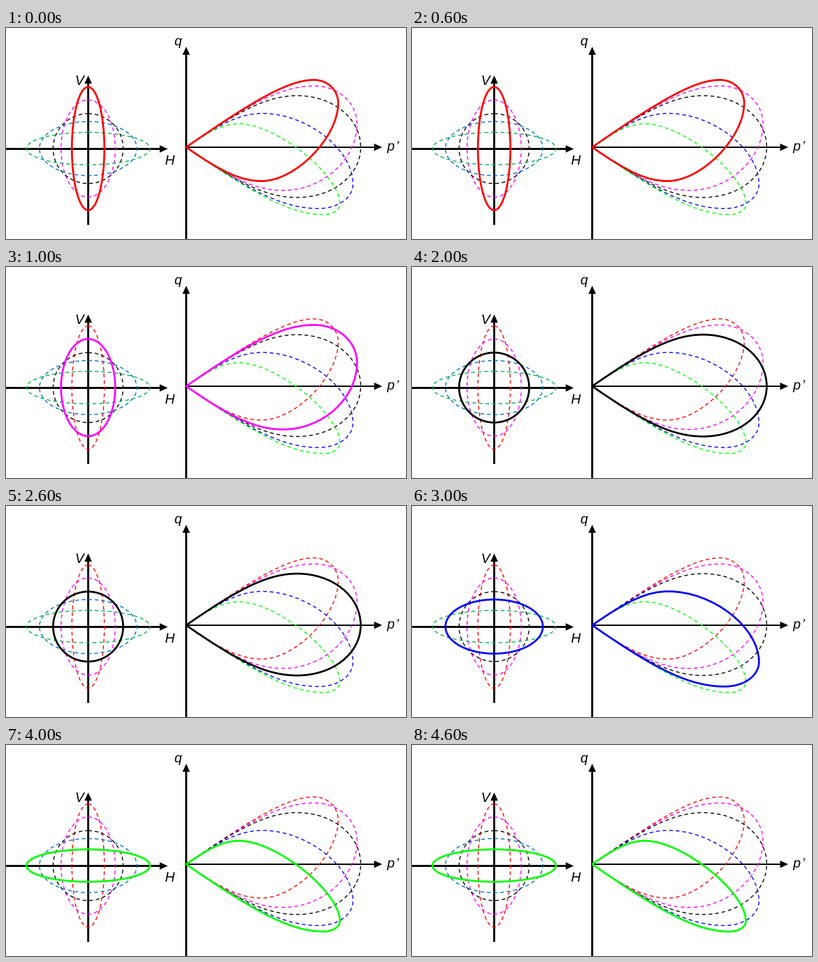
A matplotlib script that plays this animation: 596 by 315 pixels, repeating every 5 s.

```python
import matplotlib.pyplot as plt
from matplotlib.animation import FuncAnimation
from matplotlib.patches import Ellipse, PathPatch, Polygon
from matplotlib.path import Path

W, H, DPI = 596, 315, 100
PX = 72 / DPI                 # points per pixel
CENTER = (122.4, 180)         # common centre of the ellipses
ORIGIN = (268.5, 178)         # common tip of the loops
SLOPE = 0.7                   # loop tangent at the tip

SOLID = ["#ff0000", "#ff00ff", "#000000", "#0000ff", "#00ff00"]
MUTED = SOLID[:3] + ["#0070c0", "#00b050"]    # dashed ellipses

# Half-widths; read backwards they are the half-heights.
RADII = [24.2, 40.4, 52.2, 72.6, 92]

# Topmost, rightmost and lowest point of each loop.
EXTREMES = [
    [(459, 77.5), (495, 112), (381, 228.5)],
    [(459, 86.5), (523, 143), (413, 242.5)],
    [(434, 101), (528.5, 178), (434, 253)],
    [(382, 127.5), (517, 233), (466, 269.5)],
    [(347, 143), (497.5, 263), (473, 278.5)],
]

fig = plt.figure(figsize=(W / DPI, H / DPI), dpi=DPI, facecolor="white")
ax = fig.add_axes([0, 0, 1, 1])
ax.set_xlim(0, W)
ax.set_ylim(H, 0)
ax.axis("off")


def toward(a, b, k):
    return a[0] + k * (b[0] - a[0]), a[1] + k * (b[1] - a[1])


def loop_path(top, right, bottom):
    """Teardrop of four cubic arcs, each rounding off one corner."""
    x0, y0 = ORIGIN
    tilt = (y0 - right[1]) / (right[0] - x0)
    short, long = 0.56, 0.56 - 1.4 * tilt ** 2    # the longer arc is flatter
    upper, lower = (short, long) if tilt > 0 else (long, short)
    arcs = [
        (ORIGIN, (x0 + (y0 - top[1]) / SLOPE, top[1]), top, 0.75),
        (top, (right[0], top[1]), right, upper),
        (right, (right[0], bottom[1]), bottom, lower),
        (bottom, (x0 + (bottom[1] - y0) / SLOPE, bottom[1]), ORIGIN, 0.75),
    ]
    verts = [ORIGIN]
    for start, corner, end, k in arcs:
        verts += [toward(start, corner, k), toward(end, corner, k), end]
    return Path(verts, [Path.MOVETO] + [Path.CURVE4] * 12)


def axis(x0, y0, x1, y1, width=3, length=12, half=5.5):
    """Straight axis with an arrowhead whose tip is at (x1, y1)."""
    size = abs(x1 - x0) + abs(y1 - y0)
    dx, dy = (x1 - x0) / size, (y1 - y0) / size
    bx, by = x1 - dx * length, y1 - dy * length
    ax.add_patch(Polygon([(x0 + dy * width / 2, y0 + dx * width / 2),
                          (x0 - dy * width / 2, y0 - dx * width / 2),
                          (bx - dy * width / 2, by - dx * width / 2),
                          (bx + dy * width / 2, by + dx * width / 2)],
                         fc="black", ec="none", zorder=1))
    ax.add_patch(Polygon([(x1, y1), (bx - dy * half, by + dx * half),
                          (bx + dy * half, by - dx * half)],
                         fc="black", ec="none", zorder=1))


def label(x, y, text):
    ax.text(x, y, text, family="Liberation Sans", style="italic",
            size=20 * PX, va="baseline", ha="left")


def outline(make, solid, dashed):
    """Bold and dashed versions of one curve."""
    bold = make(fc="none", ec=solid, lw=2.8 * PX, zorder=3)
    dash = make(fc="none", ec=dashed, lw=1.4 * PX, zorder=2,
                ls=(0, (4, 3)), capstyle="butt")
    ax.add_patch(bold)
    ax.add_patch(dash)
    return bold, dash


axis(0, 180.5, 241, 180.5)
axis(122.5, 294, 122.5, 71)
axis(268.5, 315, 268.5, 28)
axis(268, 178, 560.5, 178, width=2)

label(102, 85, "V")
label(236.5, 204.5, "H")
label(250.5, 26, "q")
label(567.5, 183, "p")
label(580.5, 183, "\u2019")

curves = []
for solid, muted, rx, ry, points in zip(SOLID, MUTED, RADII, RADII[::-1], EXTREMES):
    path = loop_path(*points)
    curves.append([
        outline(lambda **kw: Ellipse(CENTER, 2 * rx, 2 * ry, **kw), solid, muted),
        outline(lambda **kw: PathPatch(path, **kw), solid, solid),
    ])


def update(i):
    for k, pairs in enumerate(curves):
        for bold, dash in pairs:
            bold.set_visible(k == i)
            dash.set_visible(k != i)
    return [artist for pairs in curves for pair in pairs for artist in pair]


anim = FuncAnimation(fig, update, frames=len(SOLID), interval=1000,
                     repeat=True, repeat_delay=0)
plt.show()
```
